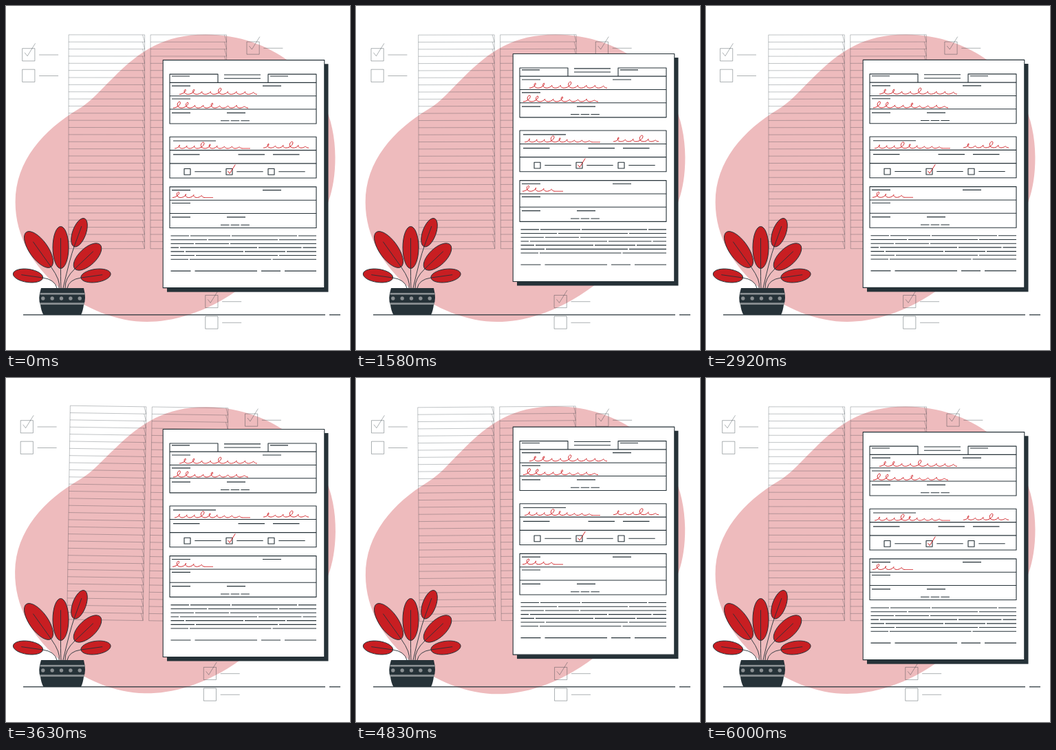
Recreate the animation shown at these times as an HTML page with a canvas. Size 500 px wide and 500 px high, loop 6040 ms.

```html
<!DOCTYPE html>
<html lang="en">
<head>
<meta charset="utf-8">
<title>Paper form</title>
<style>
html, body { margin: 0; width: 100%; height: 100%; overflow: hidden; background: #fff; }
canvas { display: block; width: 500px; height: 500px; }
</style>
</head>
<body>
<canvas id="stage"></canvas>
<script>
const LOOP = 6040, LEAD = 20;
const DARK = '#263238', RED = '#c81e22', INK = '#d2262b', PINK = '#eebbbd', GREY = '#8a8f92';
const canvas = document.getElementById('stage');
const ctx = canvas.getContext('2d');
const ratio = window.devicePixelRatio || 1;
canvas.width = canvas.height = 500 * ratio;

function stroke(path, color, width) {
  ctx.strokeStyle = color;
  ctx.lineWidth = width;
  ctx.stroke(path);
}

// Horizontal lines of equal length at height y
function lines(path, y, length, ...starts) {
  for (const x of starts) {
    path.moveTo(x, y);
    path.lineTo(x + length, y);
  }
}

// A check mark; s scales it, x and y place its lower point
function checkMark(path, x, y, s) {
  path.moveTo(x - 4 * s, y - 5 * s);
  path.lineTo(x, y);
  path.lineTo(x + 11.5 * s, y - 18.4 * s);
}

// Looped cursive: each digit is the height of one letter
function scribble(x, y, end, heights) {
  const path = new Path2D();
  const step = (end - x) / heights.length;
  path.moveTo(x, y);
  [...heights].forEach((h, i) => {
    for (let k = 1; k <= 16; k++) {
      const u = k / 16, turn = 2 * Math.PI * u;
      const rise = h * (1 - Math.cos(turn)) / 2;
      path.lineTo(x + step * (i + u) + 0.35 * rise + 0.5 * h * Math.sin(turn), y - rise);
    }
  });
  return path;
}

const blob = new Path2D(
  'M290 41.6C230 41.6 195 65 156 104C135 124 125 138 105 150' +
  'C55 180 13.6 225 13.6 285C13.6 385 120 459 205 459' +
  'C240 459 290 448 345 407C425 352 478.5 320 478.5 220' +
  'C478.5 162 455 110 411 80C380 58 340 41.6 290 41.6Z');

const sheets = new Path2D();
const ROWS = 30, ROW = 10.36, SHEET_TOP = 41.9, SHEET_WIDTH = 110.5;
for (const x of [91, 210]) {
  const right = x + SHEET_WIDTH;
  sheets.rect(x, SHEET_TOP, SHEET_WIDTH, ROWS * ROW);
  for (let i = 0; i < ROWS; i++) {
    const y = SHEET_TOP + i * ROW;
    if (i) lines(sheets, y, SHEET_WIDTH, x);
    sheets.moveTo(right - 3, y);
    sheets.lineTo(right, y + ROW);
  }
}

const checks = new Path2D();
function listItem(x, y, ticked) {
  checks.rect(x, y, 18.2, 18.2);
  lines(checks, y + 9.3, 28, x + 24.4);
  if (ticked) checkMark(checks, x + 7.4, y + 11, 1);
}
listItem(23.7, 61.7, true);
listItem(23.7, 92.2, false);
listItem(350, 52, true);
listItem(289.8, 420.4, true);
listItem(289.8, 451, false);

const form = new Path2D();
const LEFT = 238, RIGHT = 451, WIDTH = RIGHT - LEFT;

function block(y) {
  form.rect(LEFT, y, WIDTH, 59.7);
  lines(form, y + 19.4, WIDTH, LEFT);
  lines(form, y + 38.6, WIDTH, LEFT);
}

function nameBlock(y) {
  block(y);
  lines(form, y + 4.8, 27, 241, 373);
  lines(form, y + 23.7, 27, 241);
  lines(form, y + 44, 27, 241, 321);
  lines(form, y + 55.4, 12.5, 312, 326.7, 341.4);
}

for (const x of [LEFT, RIGHT - 70]) {
  form.rect(x, 99.3, 70, 12.2);
  lines(form, 102.2, 26, x + 3);
}
lines(form, 100.2, 53, 317);
lines(form, 105.4, 53, 317);
nameBlock(111.5);
nameBlock(263);

const CHOICES = 190.4;
block(CHOICES);
lines(form, CHOICES + 5.8, 62, 243);
lines(form, CHOICES + 25.6, 38.5, 243, 337.5, 388);
for (let i = 0; i < 3; i++) {
  const x = 259 + 61 * i;
  form.rect(x, CHOICES + 46.2, 9, 8.8);
  lines(form, CHOICES + 50.5, 38.4, x + 15.3);
}

// A ruled row of small print, broken at the given places
function brokenRow(y, gap, breaks) {
  let x = LEFT + 1.5;
  for (const b of [...breaks, RIGHT + gap / 2]) {
    lines(form, y, b - gap / 2 - x, x);
    x = b + gap / 2;
  }
}
[[267, 327, 424], [293, 396], [274, 325], [252, 366, 430.5], [260, 346, 407], [275, 396], [266, 386.5]]
  .forEach((breaks, i) => brokenRow(334.2 + i * 5.7, 2, breaks));
brokenRow(385.3, 6, [271.5, 368, 402]);

const ink = [
  scribble(252, 128.5, 365, '774494443'),
  scribble(243, 148.3, 352, '984473342'),
  scribble(245, 207.2, 355, '5449643320'),
  scribble(374, 206.4, 440, '634942'),
  scribble(242, 278.6, 301, '85430')
];
const mark = new Path2D();
checkMark(mark, 325.2, 243.6, 0.7);
ink.push(mark);

// Centre, half length, half width and direction of each leaf
const leaves = [
  [32, 392, 21.8, 9.6, -172], [47.5, 354, 31, 13.4, -125.5], [79.5, 351, 30.5, 11.5, -90],
  [106.5, 329.3, 21.8, 9.7, -70], [118.5, 364.5, 25.4, 12.4, -43.5], [130.5, 392, 21.8, 9.6, -8]
];

function drawLeaf([x, y, r, w, deg], i) {
  const a = deg * Math.PI / 180, dx = Math.cos(a), dy = Math.sin(a);
  const leaf = new Path2D(), stem = new Path2D();
  leaf.ellipse(x, y, r, w, a, 0, 2 * Math.PI);
  ctx.fillStyle = RED;
  ctx.fill(leaf);
  stroke(leaf, DARK, 1);
  stem.moveTo(x + dx * r * 0.45, y + dy * r * 0.45);
  stem.lineTo(x - dx * r, y - dy * r);
  stem.quadraticCurveTo(x - dx * r * 1.8, y - dy * r * 1.8, 74 + 3 * i, 410);
  stroke(stem, DARK, 0.9);
}

const pot = new Path2D('M51 410H113Q117 426 113 434Q112 443 109 449H54.500Q51 443 50 434Q46 426 51 410Z');

function drawPlant() {
  leaves.forEach(drawLeaf);
  ctx.fillStyle = DARK;
  ctx.fill(pot);
  ctx.fillStyle = GREY;
  ctx.fillRect(49.5, 417, 65, 2.6);
  ctx.fillRect(49.5, 431.3, 64.5, 2.8);
  for (let i = 0; i < 5; i++) {
    ctx.beginPath();
    ctx.arc(53.8 + i * 13.35, 425, 2.7, 0, 7);
    ctx.fill();
  }
}

function drawForm() {
  ctx.fillStyle = DARK;
  ctx.fillRect(234, 84.4, 234.5, 331.4);
  const page = new Path2D();
  page.rect(228.2, 78.8, 234.6, 331);
  ctx.fillStyle = '#fff';
  ctx.fill(page);
  stroke(page, DARK, 1.1);
  stroke(form, DARK, 1.1);
  for (const line of ink) stroke(line, INK, 1);
}

function shifted(x, y, draw) {
  ctx.save();
  ctx.translate(x, y);
  draw();
  ctx.restore();
}

function turned(x, y, deg, draw) {
  shifted(x, y, () => {
    ctx.rotate(deg * Math.PI / 180);
    ctx.translate(-x, -y);
    draw();
  });
}

// 0 to 1 and back over one period
const swing = (t, period) => 1 - Math.abs(1 - 2 * (t % period) / period);

// 0, 1, -1, 0 at 0, 25, 75 and 100 percent
function sway(t) {
  const p = t % 3000 / 3000;
  return p < 0.25 ? 4 * p : p < 0.75 ? 2 - 4 * p : 4 * p - 4;
}

const ground = new Path2D();
lines(ground, 448.9, 439, 25);
lines(ground, 448.9, 16, 470);

function render(t) {
  ctx.setTransform(ratio, 0, 0, ratio, 0, 0);
  ctx.fillStyle = '#fff';
  ctx.fillRect(0, 0, 500, 500);
  ctx.lineJoin = 'round';
  const tilt = sway(t);
  turned(246, 250.3, tilt, () => {
    ctx.fillStyle = PINK;
    ctx.fill(blob);
  });
  turned(205.7, 197.3, tilt, () => stroke(sheets, 'rgba(38,50,56,0.32)', 0.9));
  shifted(-3.2 * swing(t, 6000), 0, () => stroke(checks, 'rgba(38,50,56,0.38)', 1));
  stroke(ground, DARK, 1.1);
  drawPlant();
  shifted(0, -10 * swing(t, 3000), drawForm);
}

const start = performance.now();
function tick() {
  render((performance.now() - start) % LOOP + LEAD);
  requestAnimationFrame(tick);
}
tick();
</script>
</body>
</html>
```
